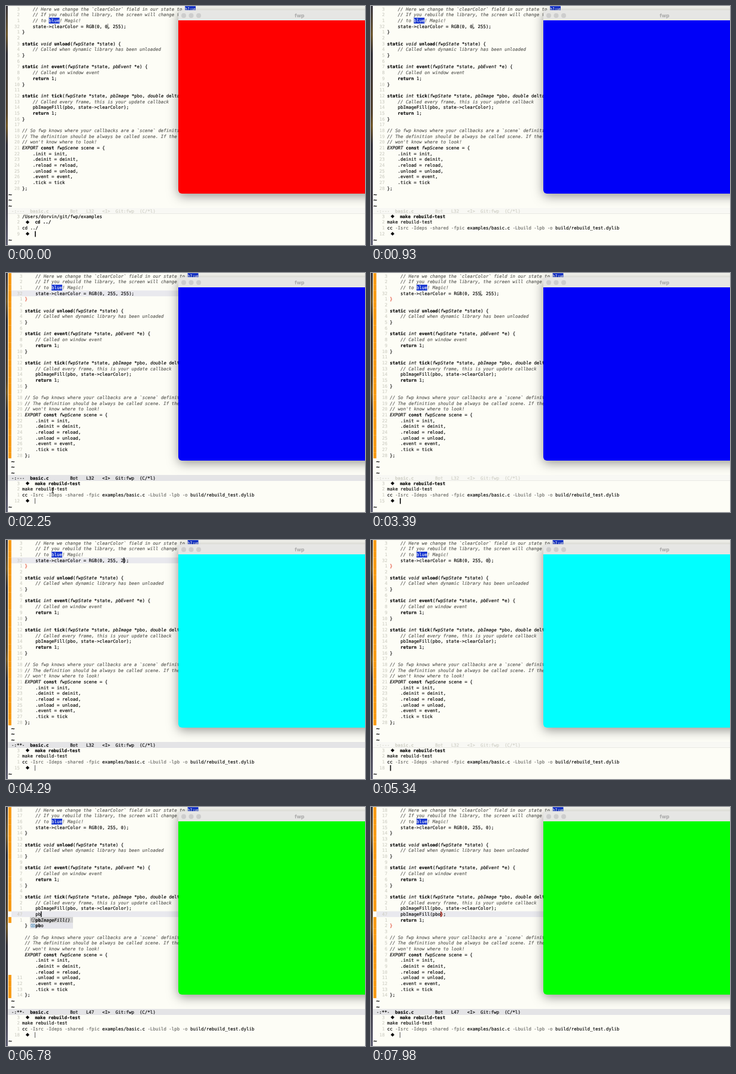
Write an HTML page with a canvas that moves like this. It is 600 by 400 pixels and loops after 8000 ms.

```html
<!DOCTYPE html>
<html lang="en">
<head>
<meta charset="utf-8">
<title>Live code reload</title>
<style>
  html, body { margin: 0; width: 100%; height: 100%; overflow: hidden; background: #fdfdf6; }
  canvas { display: block; width: 600px; height: 400px; }
</style>
</head>
<body>
<canvas id="stage" width="600" height="400"></canvas>
<script>
const LOOP = 8000, SIZE = 7.41, COL = 4.461, ROW = 9.68;
const ctx = document.getElementById('stage').getContext('2d');
const INK = '#0a0a0a', PALE = '#d0d0c6', COMMENT = '#5e5e5a', PAPER = '#fdfdf6';
const HILITE = '#e9e9ee', ORANGE = '#f89c18', MARK = '#1030d0', WARN = '#e04028';
const BOLD = 'bold', ITALIC = 'italic';

const COMMAND = 'make rebuild-test';
const COMPILE = 'cc -Isrc -Ideps -shared -fpic examples/basic.c -Lbuild -lpb -o build/rebuild_test.dylib';
const HISTORY = ['/Users/dorvin/git/fwp/examples', '>cd ../', 'cd ../'];
const RUNS = [
  { type: 150, enter: 690, color: '#0000f8' },
  { type: 2640, enter: 3240, color: '#00ffff' },
  { type: 4710, enter: 5250, color: '#00ff00' }
];

// Each step holds until the next one: [time, value, ...]
const FOCUS = [[0, 'term'], [1350, 'code'], [2550, 'term'], [3840, 'code'], [4650, 'term'], [5760, 'code']];
const ARGS = [
  [0, '0, 0, 255', 4], [1690, '0, , 255', 3], [1810, '0, 2, 255', 4], [1900, '0, 25, 255', 5],
  [1980, '0, 255, 255', 6], [4050, '0, 255, 255', 11], [4170, '0, 255, 25', 10],
  [4260, '0, 255, 2', 9], [4350, '0, 255, ', 8], [4470, '0, 255, 0', 9]
];
const INSERT = [
  [6400, '', 0], [6600, 'p', 1], [6690, 'pb', 2], [7050, 'pbImageFill();', 12],
  [7350, 'pbImageFill(p);', 13], [7440, 'pbImageFill(pb);', 14], [7530, 'pbImageFill(pbo);', 15]
];
const DIRTY = [[0, false], [1690, true], [2130, false], [4170, true], [4560, false], [6400, true]];
const BLINK_OFF = [[900, 1300], [2180, 2550], [3600, 3840], [5560, 5760]];
const SAVED = 2130, MOVE = 5900, OPEN = 6400, POPUP = [6750, 7050];

const at = (steps, t) => steps.filter(step => step[0] <= t).pop();
const within = ([from, to], t) => t >= from && t < to;

function codeLines(args) {
  return [
    '    // Here we change the `clearColor` field in our state to blue',
    '    // If you rebuild the library, the screen will change from',
    '    // to blue! Magic!',
    `    state->clearColor = RGB(${args});`,
    '}',
    '',
    'static void unload(fwpState *state) {',
    '    // Called when dynamic library has been unloaded',
    '}',
    '',
    'static int event(fwpState *state, pbEvent *e) {',
    '    // Called on window event',
    '    return 1;',
    '}',
    '',
    'static int tick(fwpState *state, pbImage *pbo, double delta) {',
    '    // Called every frame, this is your update callback',
    '    pbImageFill(pbo, state->clearColor);',
    '    return 1;',
    '}',
    '',
    '// So fwp knows where your callbacks are a `scene` definition',
    '// The definition should be always be called scene. If the',
    "// won't know where to look!",
    'EXPORT const fwpScene scene = {',
    ...['init', 'deinit', 'reload', 'unload', 'event', 'tick'].map(
      (name, i) => `    .${name} = ${name}${i < 5 ? ',' : ''}`),
    '};'
  ];
}

// A hairline outline gives the slightly heavier strokes of the editor font.
function text(str, x, y, color = INK, style = '', size = SIZE) {
  ctx.font = `${style} ${size}px "DejaVu Sans Mono", monospace`;
  ctx.fillStyle = ctx.strokeStyle = color;
  ctx.lineWidth = .16;
  ctx.fillText(str, x, y);
  ctx.strokeText(str, x, y);
}

function box(x, y, w, h, color) {
  ctx.fillStyle = color;
  ctx.fillRect(x, y, w, h);
}

function lineNumber(n, right, y) {
  const label = String(n);
  text(label, right - label.length * COL, y, PALE);
}

const tilde = (x, y) => text('~', x, y + 1.2, INK, BOLD, 10);

const TOKENS = /(\b(?:static|return|const)\b|\b(?:unload|event|tick)(?=\()|\b(?:void|int|double|fwpState|pbEvent|pbImage|fwpScene|EXPORT)\b)/;
const TYPES = /^(void|int|double|fwpState|pbEvent|pbImage|fwpScene|EXPORT)$/;

function codeText(line, x, y, color) {
  if (line.trim().startsWith('//')) {
    text(line, x, y, COMMENT, ITALIC);
    const col = line.search(/\bblue\b/);
    if (col >= 0) {
      box(x + col * COL, y - 7.4, 4 * COL, ROW, MARK);
      text('blue', x + col * COL, y, '#f4f4f4');
    }
    return;
  }
  let col = 0;
  line.split(TOKENS).forEach((part, i) => {
    const style = i % 2 ? (TYPES.test(part) ? ITALIC : BOLD) : '';
    text(part, x + col * COL, y, color, style);
    col += part.length;
  });
}

function drawDesktop() {
  box(0, 0, 600, 400, PAPER);
  const strip = ctx.createLinearGradient(0, 0, 0, 400);
  [[0, '#35323c'], [.12, '#6b5428'], [.2, '#2b2930'], [.45, '#4f3d26'], [.5, '#6e5320'],
   [.58, '#2c2a33'], [.82, '#3a3740'], [1, '#5c5c70']].forEach(([p, c]) => strip.addColorStop(p, c));
  box(0, 0, 3, 400, strip);
}

function drawCode(t, active, cursorOn) {
  const x = t < SAVED ? 27 : 31.5;
  const baseline = i => 36.7 + (i - 3) * ROW;
  const [, args, argCol] = at(ARGS, t);
  const lines = codeLines(args);
  const inserted = at(INSERT, t);
  let row = 3, col = 28 + argCol;
  if (inserted) {
    lines.splice(18, 0, '    ' + inserted[1]);
    row = 18;
    col = 4 + inserted[2];
  } else if (t >= MOVE) {
    row = 3 + Math.min(14, Math.floor((t - MOVE) / 32));
    col = Math.min(col, lines[row].length);
  }
  const popup = within(POPUP, t);
  const braceRow = inserted ? 20 : 4;

  if (active) box(9, baseline(row) - 7.4, 279, ROW, HILITE);
  lines.forEach((line, i) => {
    const y = baseline(i);
    const redrawn = popup && i > 19 && i < 29;
    const unsaved = inserted && i === row;
    if (t >= SAVED && !redrawn && !unsaved) box(4, y - 7.4, 5, ROW + .2, ORANGE);
    if (!redrawn) lineNumber(i === row ? 29 + row : Math.abs(i - row), x - 4, y);
    codeText(line, x, y, t >= SAVED && !popup && i === braceRow ? WARN : INK);
  });
  for (let i = lines.length; i < 35; i++) tilde(x - 23, baseline(i));

  const cx = x + col * COL, cy = baseline(row);
  if (t >= 7530) text(')', cx, cy, WARN);
  if (!active) box(cx, cy - 7, .8, 9, '#444444');
  else if (cursorOn) box(cx - .2, cy - 7.2, 1.4, 9.4, t >= 7050 ? '#8c1810' : INK);
  if (popup) drawPopup(x, baseline(19));
  return 29 + row;
}

function drawPopup(x, y) {
  box(40, y - 7.4, 72, ROW, '#d0d0d0');
  box(40, y - 7.4 + ROW, 72, ROW, '#e5e5ea');
  const px = x + 4 * COL;
  text('pb', px, y, INK, BOLD);
  text('ImageFill()', px + 2 * COL, y, INK, ITALIC);
  text('pb', px, y + ROW, INK, BOLD);
  text('o', px + 2 * COL, y + ROW);
  ctx.strokeStyle = '#666666';
  ctx.lineWidth = .8;
  ctx.beginPath();
  for (let k = 0; k < 6; k++) {
    const a = Math.PI * (k / 3 + 1 / 6);
    ctx.lineTo(45.5 + 3.6 * Math.cos(a), y - 2.6 + 3.6 * Math.sin(a));
  }
  ctx.closePath();
  for (let k = 0; k < 3; k++) {
    const a = Math.PI * (k * 2 / 3 + .5);
    ctx.moveTo(45.5, y - 2.6);
    ctx.lineTo(45.5 + 3.6 * Math.cos(a), y - 2.6 + 3.6 * Math.sin(a));
  }
  ctx.stroke();
  ctx.strokeStyle = '#3a86b8';
  ctx.strokeRect(42, y + ROW - 5, 6, 4.5);
  box(44, y + ROW - 3.5, 2, 1.6, '#3a86b8');
}

function drawModeline(t, active, line) {
  box(3, 338, 597, 10, active ? '#e4e4e6' : '#f8f8f4');
  if (!active) box(3, 347.2, 597, .8, '#e8e8e2');
  const ink = active ? INK : PALE;
  const put = (col, str, style) => text(str, 9 + col * COL, 345.5, ink, style);
  put(0, at(DIRTY, t)[1] ? '-:**-' : '-:---');
  put(7, 'basic.c', BOLD);
  put(22, 'Bot');
  put(28, 'L' + line);
  put(34, within([MOVE, OPEN], t) ? '<N>' : '<I>');
  put(39, 'Git:fwp');
  put(48, '(C/*l)');
}

// Lines starting with ">" carry the prompt.
function terminalLines(t) {
  const lines = [...HISTORY];
  let current = '>';
  for (const run of RUNS) {
    if (t < run.type) break;
    if (t < run.enter) {
      current = '>' + COMMAND.slice(0, Math.floor((t - run.type) / 30));
      break;
    }
    lines.push('>' + COMMAND, COMMAND);
    if (t >= run.enter + 30) lines.push(COMPILE);
    current = t < run.enter + 120 ? '' : '>';
  }
  return [...lines, current];
}

function drawTerminal(t, active, cursorOn) {
  const lines = terminalLines(t);
  const baseline = k => 354.8 + k * ROW;
  lines.slice(-4).forEach((line, k) => {
    const y = baseline(k);
    lineNumber(k < 3 ? 3 - k : lines.length + 5, 23, y);
    if (line[0] === '>') {
      ctx.fillStyle = INK;
      ctx.beginPath();
      [[0, -3.1], [3.1, 0], [0, 3.1], [-3.1, 0]].forEach(([dx, dy]) => ctx.lineTo(36 + dx, y - 2.7 + dy));
      ctx.fill();
      text(line.slice(1), 48.4, y, INK, BOLD);
    } else {
      let col = 0;
      line.split(/( -\w+)/).forEach(part => {
        text(part, 27 + col * COL, y, part.startsWith(' -') ? '#6c6c68' : INK);
        col += part.length;
      });
    }
  });
  tilde(4, baseline(4));

  const current = lines[lines.length - 1];
  const x = current ? 48.2 + (current.length - 1) * COL : 31.8;
  if (!active) box(x, 376.8, .8, 9.4, '#333333');
  else if (cursorOn) box(x, 376.8, 1.6, 9.6, INK);
}

function drawWindow(t) {
  const done = RUNS.filter(run => t >= run.enter + 180).pop();
  ctx.save();
  ctx.shadowColor = 'rgba(0, 0, 0, .42)';
  ctx.shadowBlur = 18;
  ctx.shadowOffsetY = 4;
  ctx.fillStyle = '#e6e6e4';
  ctx.beginPath();
  ctx.roundRect(288, 7, 340, 307, 6);
  ctx.fill();
  ctx.restore();
  ctx.save();
  ctx.clip();
  box(288, 24, 312, 290, done ? done.color : '#ff0000');
  ctx.restore();
  [297, 309.5, 322].forEach(cx => {
    ctx.fillStyle = '#cdcdcd';
    ctx.beginPath();
    ctx.arc(cx, 16, 4, 0, 7);
    ctx.fill();
  });
  ctx.font = 'bold 8.5px Inter, sans-serif';
  ctx.fillStyle = '#a4a4a4';
  ctx.fillText('fwp', 482.5, 18.6);
}

function drawPointer(t) {
  if (!within([2130, 2560], t)) return;
  const p = Math.min(1, (t - 2130) / 110), ease = p * (2 - p);
  const x = 172 - 94 * ease, y = 60 + 304 * ease;
  box(x - .5, y - 4, 1, 8, INK);
  box(x - 2, y - 4.5, 4, .9, INK);
  box(x - 2, y + 3.6, 4, .9, INK);
}

function draw(t) {
  const focus = at(FOCUS, t)[1];
  const cursorOn = !BLINK_OFF.some(span => within(span, t));
  drawDesktop();
  const line = drawCode(t, focus === 'code', cursorOn);
  drawModeline(t, focus === 'code', line);
  drawTerminal(t, focus === 'term', cursorOn);
  drawWindow(t);
  drawPointer(t);
}

ctx.textRendering = 'geometricPrecision';
ctx.lineJoin = 'round';
const start = performance.now();
function tick() {
  draw((performance.now() - start) % LOOP);
  requestAnimationFrame(tick);
}
tick();
</script>
</body>
</html>
```
